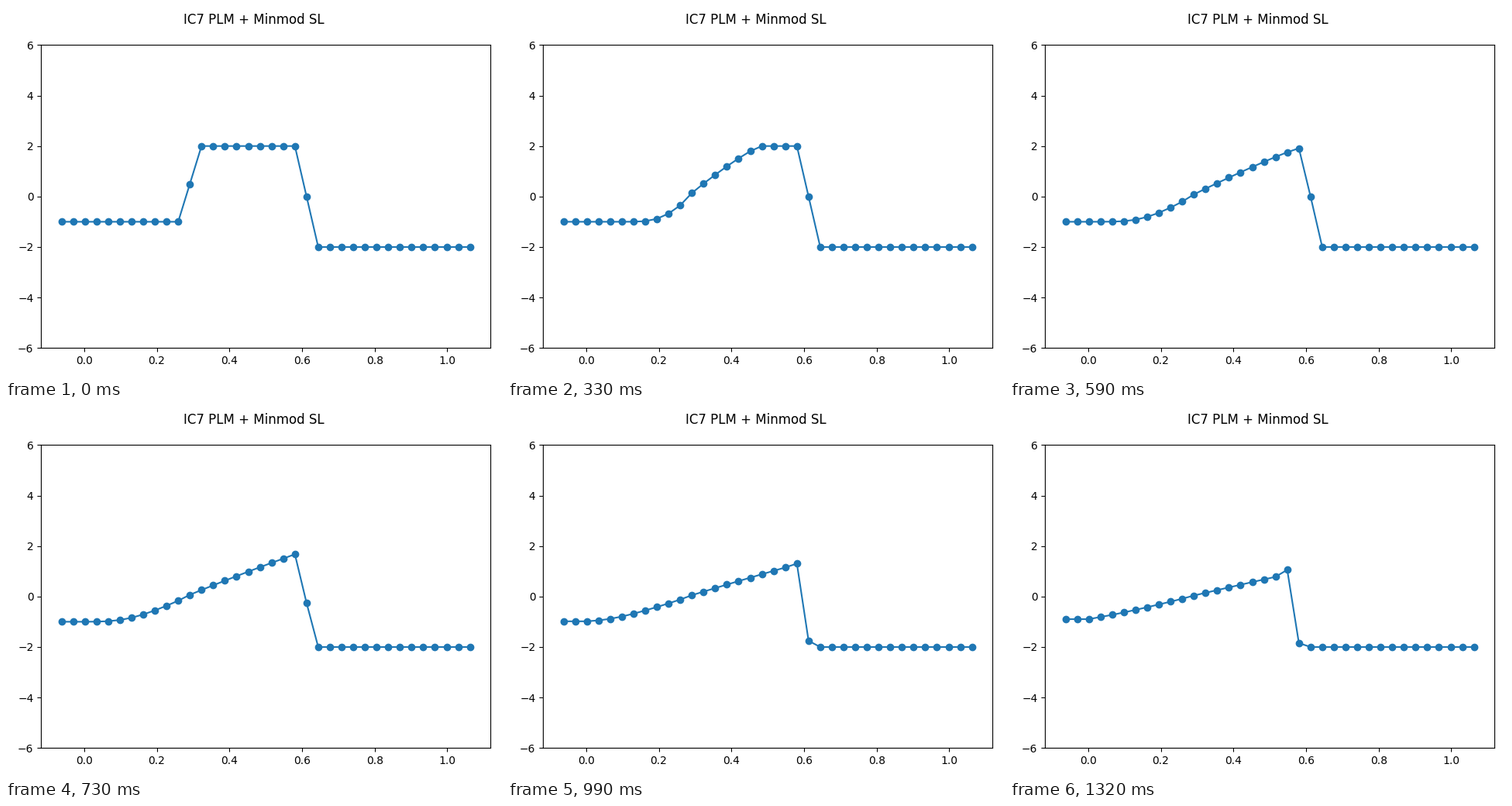
These frames come from a looping animation (640 px wide and 480 px high, 1.39 s). A matplotlib script:

```python
import numpy as np
import matplotlib.pyplot as plt
from matplotlib.animation import FuncAnimation

CELLS = 32
GHOSTS = 2
CFL = 0.9
STEPS = 20
TICK_MS = 10            # animation clock
TICKS = 139             # one loop
TICKS_PER_STEP = 6.6

MARGIN = GHOSTS / CELLS
RATIO = CFL / 2         # dt / dx for a top speed of 2
MIN_SPEED = 0.03        # slower faces count as moving left


def initial_state():
    cell = np.arange(-GHOSTS, CELLS + GHOSTS)
    return np.select([cell < 9, cell == 9, cell < 19, cell == 19],
                     [-1.0, 0.5, 2.0, 0.0], -2.0)


def minmod(a, b):
    return np.where(a * b > 0, np.sign(a) * np.minimum(abs(a), abs(b)), 0.0)


def advance(u):
    """One step of Burgers' equation with limited piecewise linear states."""
    jump = np.diff(u)
    slope = np.zeros_like(u)
    slope[1:-1] = minmod(jump[:-1], jump[1:])

    speed = (u[:-1] + u[1:]) / 2
    left = u[:-1] + slope[:-1] / 2 * (1 - RATIO * speed)
    right = u[1:] - slope[1:] / 2 * (1 + RATIO * speed)
    flux = np.where(speed > MIN_SPEED, left, right) ** 2 / 2

    new = u.copy()
    new[1:-1] -= RATIO * np.diff(flux)
    new[:GHOSTS] = new[GHOSTS]
    new[-GHOSTS:] = new[-GHOSTS - 1]
    return new


x = np.linspace(-MARGIN, 1 + MARGIN, CELLS + 2 * GHOSTS)
states = [initial_state()]
for _ in range(STEPS):
    states.append(advance(states[-1]))

fig, ax = plt.subplots(figsize=(6.4, 4.8), dpi=100)
fig.suptitle("IC7 PLM + Minmod SL", y=457 / 480, va="baseline")
line, = ax.plot(x, states[0], "o-", color="C0")
ax.set_ylim(-6, 6)
fig.tight_layout()
fig.subplots_adjust(top=0.895)


def update(tick):
    step = min(int((tick + 0.5) / TICKS_PER_STEP), STEPS)
    line.set_ydata(states[step])
    return line,


anim = FuncAnimation(fig, update, frames=TICKS, interval=TICK_MS,
                     repeat=True, repeat_delay=0, blit=False)
plt.show()
```
